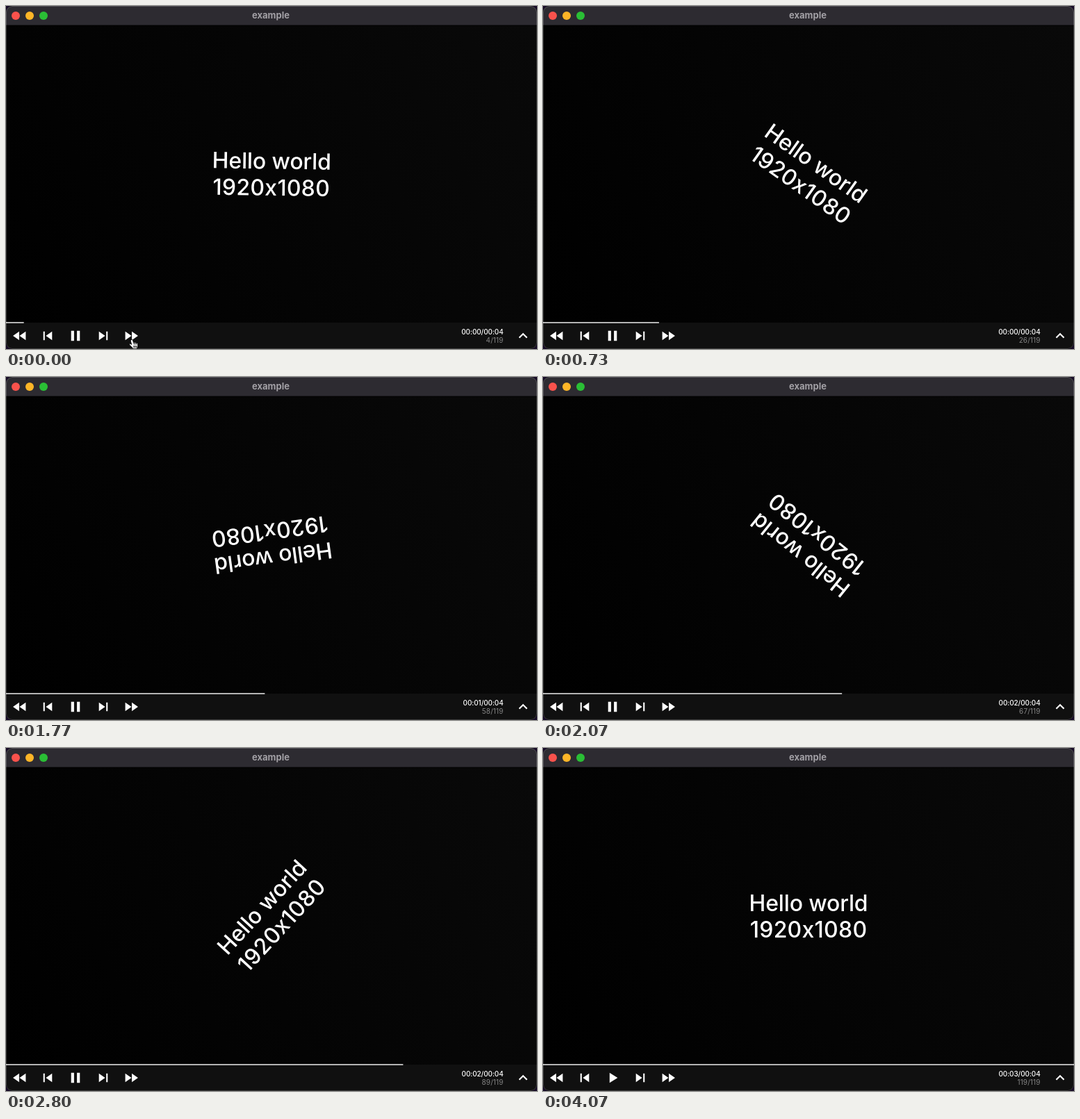
Animation of 764x494 px, one loop 4.16 s. Source, as an HTML page:

```html
<!DOCTYPE html>
<html lang="en">
<head>
<meta charset="utf-8">
<title>example</title>
<style>
  html, body { margin: 0; width: 100%; height: 100%; overflow: hidden; background: #160a26; }
  svg { display: block; width: 764px; height: 494px; }
  text { font-family: Inter, Roboto, sans-serif; fill: #fff; }
  .title { font-size: 13px; font-weight: 700; fill: #a3a1a6; text-anchor: middle; }
  .hello { font-size: 32px; font-weight: 500; text-anchor: middle; }
  .status { font-size: 10px; text-anchor: end; }
</style>
</head>
<body>
<svg viewBox="0 0 764 494">
  <defs>
    <linearGradient id="shade" gradientUnits="userSpaceOnUse" x1="-6" y1="442" x2="770" y2="42">
      <stop offset="0" stop-color="#000"/>
      <stop offset="1" stop-color="#090909"/>
    </linearGradient>
    <clipPath id="window"><rect width="764" height="494" rx="9"/></clipPath>
  </defs>
  <g clip-path="url(#window)">
    <rect width="764" height="494" fill="#101010"/>
    <rect y="28" width="764" height="428" fill="url(#shade)"/>
    <rect width="764" height="28" fill="#2d2b31"/>
    <rect y="27.5" width="764" height="1" fill="#000"/>
    <circle cx="14" cy="14" r="6" fill="#f9524c"/>
    <circle cx="34" cy="14" r="6" fill="#fdb527"/>
    <circle cx="54" cy="14" r="6" fill="#2abe35"/>
    <text class="title" x="381" y="18">example</text>

    <g id="spinner" class="hello">
      <text x="382" y="234.5" letter-spacing="-.15">Hello world</text>
      <text x="382" y="273" letter-spacing=".25">1920x1080</text>
    </g>

    <rect id="progress" y="455" height="2" fill="#b4b4b4"/>
    <g id="icons" fill="#fff"></g>
    <text id="clock" class="status" x="715.7" y="473" font-weight="500" letter-spacing="-.1"></text>
    <text id="counter" class="status" x="715.5" y="485" letter-spacing=".1" style="fill:#858585"></text>
    <rect x=".5" y=".5" width="763" height="493" rx="8.5" fill="none" stroke="#fff" stroke-opacity=".18"/>
    <g id="cursor" fill="#fff" stroke="#000" stroke-width=".9" stroke-linejoin="round" stroke-linecap="round">
      <path d="M180 480.5q1.6-1 2.4.8l1.2 3.2q1.2-.8 2 .2 1.2-.7 2 .4 1.6-.4 2 1.2.5 2-.4 4.2l-.6 3.2h-5.6l-2.6-3.2-2.8-2.6q-.6-1.6 1-1.7l2 1.1-1.5-5.4q-.1-.9.9-1.4z"/>
      <path d="M183.6 484.5l.7 2.6M185.6 484.8l.5 2.3M187.6 485.2l.3 2M183.8 489.2v2.6M185.6 489.2v2.6M187.4 489.2v2.6" fill="none"/>
    </g>
  </g>
</svg>
<script>
  const LOOP = 4160, FPS = 30, LAST = 119, ENDED = 3870, CURSOR_GONE = 100;
  const $ = id => document.getElementById(id);

  const shapes = {
    rewind: "M11 18V6l-8.5 6zM11.5 12l8.5 6V6z",
    previous: "M6 6h2v12H6zM9.5 12l8.5 6V6z",
    pause: "M6 5h4v14H6zM14 5h4v14h-4z",
    play: "M8 5v14l11-7z",
    next: "M6 18l8.5-6L6 6zM16 6h2v12h-2z",
    forward: "M4 18l8.5-6L4 6zM13 6v12l8.5-6z",
    expand: "M12 8l-6 6 1.41 1.41L12 10.83l4.59 4.58L18 14z"
  };

  function addIcon(name, cx) {
    const path = document.createElementNS("http://www.w3.org/2000/svg", "path");
    path.setAttribute("d", shapes[name]);
    path.setAttribute("transform", `translate(${cx} 475) scale(1.05) translate(-12 -12)`);
    $("icons").append(path);
    return path;
  }

  addIcon("rewind", 20);
  addIcon("previous", 60);
  const toggle = addIcon("pause", 100);
  addIcon("next", 140);
  addIcon("forward", 180);
  addIcon("expand", 744);

  // cubic-bezier(.42, 0, .58, 1), solved by bisection
  function easeInOut(p) {
    let lo = 0, hi = 1;
    for (let i = 0; i < 30; i++) {
      const s = (lo + hi) / 2, r = 1 - s;
      const x = 1.26 * r * r * s + 1.74 * r * s * s + s ** 3;
      if (x < p) lo = s; else hi = s;
    }
    return lo * lo * (3 - 2 * lo);
  }

  function videoFrame(t) {
    const tick = Math.floor((t + 3.4) * FPS / 1000);
    return Math.min(LAST, tick + (tick < 30 ? 4 : 5)); // playback drops one frame
  }

  function draw(t) {
    const n = videoFrame(t);
    const p = n / LAST;
    $("spinner").setAttribute("transform", `rotate(${360 * easeInOut(p)} 382 242)`);
    $("progress").setAttribute("width", 764 * p);
    $("clock").textContent = `00:0${Math.floor(n / FPS)}/00:04`;
    $("counter").textContent = `${n}/${LAST}`;
    toggle.setAttribute("d", t < ENDED ? shapes.pause : shapes.play);
    $("cursor").setAttribute("transform", `translate(0 ${14 * Math.min(1, t / CURSOR_GONE)})`);
    $("cursor").setAttribute("visibility", t < CURSOR_GONE ? "visible" : "hidden");
  }

  const start = performance.now();
  function tick() {
    draw((performance.now() - start) % LOOP);
    requestAnimationFrame(tick);
  }
  tick();
</script>
</body>
</html>
```
